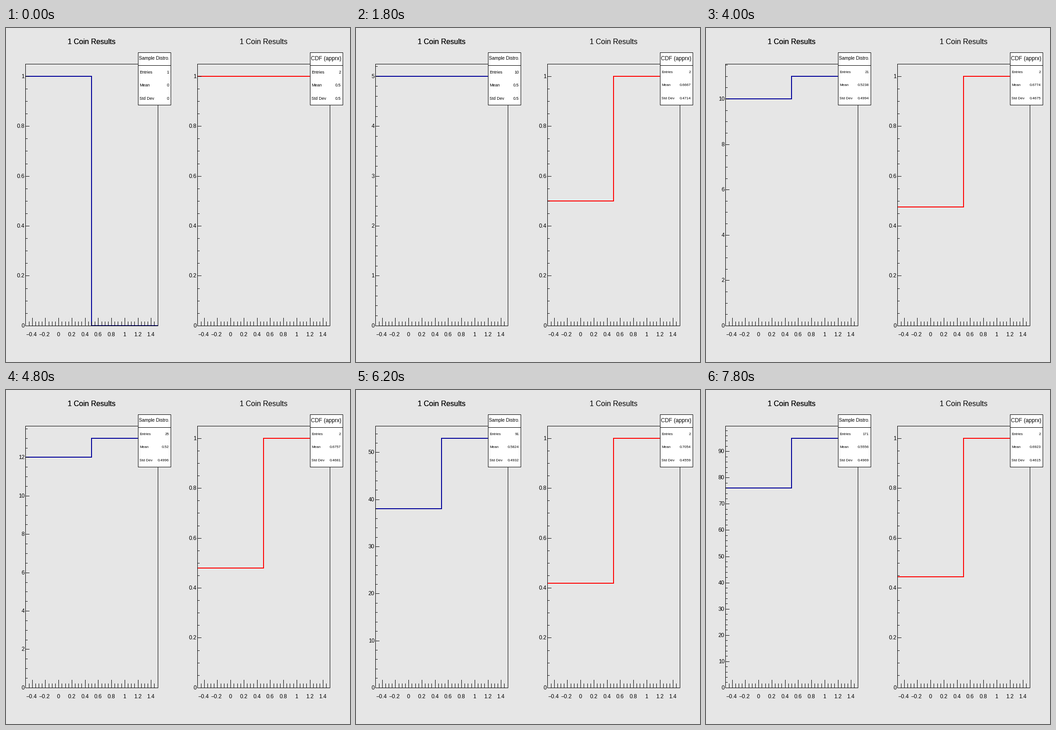
Recreate the animation shown at these times as a matplotlib script. Size 748x726 px, loop 8 s.

```python
import math

import matplotlib.pyplot as plt
from matplotlib.animation import FuncAnimation
from matplotlib.collections import LineCollection
from matplotlib.patches import Rectangle

W, H, DPI = 748, 726, 100
PX = 72 / DPI
BASE, SPAN = 647.36, 569.18     # y of zero and height of the plot area
LEFT, WIDTH = 42.9, 287.2       # plot area of the first pad
PAD = 374                       # shift to the second pad
BLUE, RED = "#000099", "#ff0000"

# Single tosses first, then the running number of ones every ten tosses.
TOSSES = "0110110001000001111110101"
LATER = [17, 23, 30, 36, 43, 47, 53, 59, 64, 70, 75, 80, 85, 91, 95]

plt.rcParams["font.family"] = "Liberation Sans"
fig = plt.figure(figsize=(W / DPI, H / DPI), dpi=DPI, facecolor="#e6e6e6")
ax = fig.add_axes([0, 0, 1, 1])
ax.set_xlim(0, W)
ax.set_ylim(H, 0)
ax.axis("off")


def text(x, y, s, size, ha="center"):
    """Text whose capitals are centred on y."""
    return ax.text(x, y + 0.35 * size - 0.6, s, fontsize=size * PX, ha=ha,
                   va="baseline", color="black", zorder=5)


def lines(segs, z=2):
    # Coordinates already sit on pixel centres, so snapping stays off.
    coll = LineCollection(segs, colors="black", linewidths=PX,
                          capstyle="butt", snap=False, zorder=z)
    return ax.add_collection(coll, autolim=False)


def box(x, y, w, h, fill, z):
    ax.add_patch(Rectangle((x + 0.5, y + 0.5), w, h, fill=fill, fc="white",
                           ec="black", lw=PX, joinstyle="miter", snap=False,
                           zorder=z))


def nice(span, n):
    raw = span / n
    mag = 10 ** math.floor(math.log10(raw))
    return next(m * mag for m in (1, 2, 5, 10) if raw <= m * mag * (1 + 1e-9))


def major_step(top):
    step = nice(top, 10)
    if int(top / step + 1.00001) == 5:
        step = nice(top, 11)
    return step


def row(v, top):
    return math.floor(BASE - SPAN * v / top)


def y_axis(dx, top):
    step = major_step(top)
    minor = nice(step, 5)
    per = round(step / minor)
    segs, out = [], []
    for k in range(int(top / minor + 1e-6) + 1):
        y = row(k * minor, top)
        big = k % per == 0
        segs.append([(42 + dx, y + 0.5), (42 + dx + (9 if big else 5), y + 0.5)])
        if big:
            out.append(text(40.3 + dx, y + 0.2, f"{k * minor:.6g}", 12, "right"))
    return out + [lines(segs)]


def x_axis(dx):
    segs = []
    for k in range(1, 40):
        x = math.floor(LEFT + dx + WIDTH * k / 40) + 0.5
        big = k % 4 == 2
        segs.append([(x, 648), (x, 630 if big else 638)])
        if big:
            v = round(-0.5 + k / 20, 1)
            label = f"{v:g}".replace("-", "\u2212")
            text(x - (1.8 if v < 0 else 0.9), 666, label, 12)
    lines(segs)


def step_line(dx, lo, hi, top, color):
    x0, xm, x1 = 42 + dx, 186 + dx, 331 + dx
    a, b = row(lo, top), row(hi, top)
    return ax.plot([x0, xm, xm, x1], [a, a, b, b], color=color, lw=2 * PX,
                   solid_capstyle="butt", solid_joinstyle="miter", zorder=1)


def stats(dx, entries, mean, dev):
    values = [str(entries), f"{mean:.4g}", f"{dev:.4g}"]
    size = 8 if max(map(len, values)) > 5 else 9
    out = []
    for y, name, v in zip((96.3, 124, 153), ("Entries", "Mean", "Std Dev"), values):
        out.append(text(290 + dx, y, name, size, "left"))
        out.append(text(354.2 + dx, y, v, size, "right"))
    return out


def counts(i):
    if i < len(TOSSES):
        seen = TOSSES[:i + 1]
        return seen.count("0"), seen.count("1")
    j = i - len(TOSSES)
    return 31 + 10 * j - LATER[j], LATER[j]


def build():
    for dx in (0, PAD):
        box(42 + dx, 78, 288, 569, False, 2)
        x_axis(dx)
        box(287 + dx, 53, 71, 114, True, 4)
        lines([[(287 + dx, 81.5), (359 + dx, 81.5)]], 4.5)
        text(186.3 + dx, 30, "1 Coin Results", 16)
    text(186.3, 30, "1 Coin Results", 16)
    text(322, 66, "Sample Distro.", 10.1)
    text(696, 66, "CDF (apprx)", 12)
    y_axis(PAD, 1.05)


moving = []


def draw(i):
    while moving:
        moving.pop().remove()
    zeros, ones = counts(i)
    n = zeros + ones
    top = 1.05 * max(zeros, ones)
    p = ones / n
    share = zeros / n
    q = 1 / (1 + share)
    moving.extend(step_line(0, zeros, ones, top, BLUE))
    moving.extend(step_line(PAD, share, 1, 1.05, RED))
    moving.extend(y_axis(0, top))
    moving.extend(stats(0, n, p, math.sqrt(p * (1 - p))))
    moving.extend(stats(PAD, 2, q, math.sqrt(q * (1 - q))))
    return moving


build()
anim = FuncAnimation(fig, draw, frames=len(TOSSES) + len(LATER), interval=200,
                     init_func=lambda: draw(0), repeat=True, repeat_delay=0,
                     blit=False)
plt.show()
```
